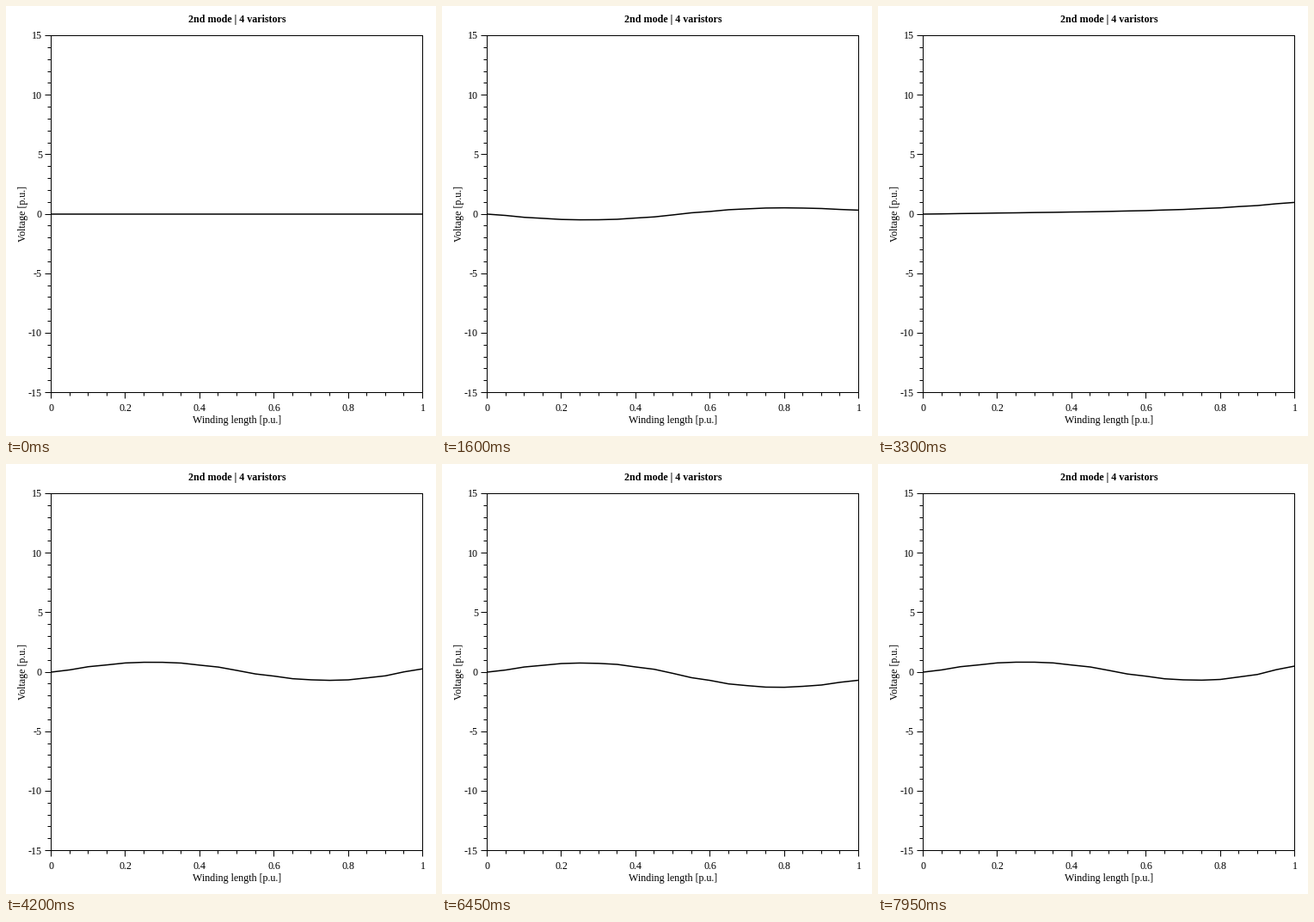
Animation, 500 px wide and 500 px high, one loop 8 s. Source, as a matplotlib script:

```python
import numpy as np
import matplotlib.pyplot as plt
from matplotlib.animation import FuncAnimation

SIZE, DPI = 500, 100
FRAMES, INTERVAL = 160, 50
LEFT, RIGHT, TOP, BOTTOM = 52.5, 484.5, 34.5, 449.5
PX = 72 / DPI  # points per pixel

plt.rcParams["font.family"] = "Liberation Serif"
plt.rcParams["font.size"] = 12 * PX

fig = plt.figure(figsize=(SIZE / DPI, SIZE / DPI), dpi=DPI, facecolor="white")
ax = fig.add_axes([0, 0, 1, 1])
ax.set_xlim(0, SIZE)
ax.set_ylim(SIZE, 0)
ax.axis("off")


def sx(x):
    return LEFT + x * (RIGHT - LEFT)


def sy(v):
    return (TOP + BOTTOM) / 2 - v * (BOTTOM - TOP) / 30


def crisp(p):
    """Centre of the pixel that holds p."""
    return np.floor(p) + 0.5


def stroke(xs, ys):
    ax.plot(xs, ys, color="black", lw=PX, snap=False,
            solid_capstyle="butt", solid_joinstyle="miter")


def label(x, y, text, ha="center", **kw):
    ax.text(x, y, text, ha=ha, va="baseline", color="black", **kw)


def draw_frame():
    stroke([LEFT, RIGHT, RIGHT, LEFT, LEFT, RIGHT],
           [TOP, TOP, BOTTOM, BOTTOM, TOP, TOP])
    for i in range(21):
        x, major = crisp(sx(i / 20)), i % 4 == 0
        stroke([x, x], [BOTTOM, BOTTOM + (7 if major else 4)])
        if major:
            label(sx(i / 20), 471, f"{i / 20:g}")
    for v in range(-15, 16):
        y, major = crisp(sy(v)), v % 5 == 0
        stroke([LEFT - (7 if major else 4), LEFT], [y, y])
        if major:
            label(42, sy(v) + 4, str(v), ha="right")
    label(268.5, 19, "2nd mode | 4 varistors", weight="bold")
    label(268.5, 485, "Winding length [p.u.]")
    label(23, 242, "Voltage [p.u.]", rotation=90, rotation_mode="anchor")


nodes = np.linspace(0, 1, 21)
# Every other node sits slightly nearer to its end of the winding
coil = nodes + 0.01 * np.sign(nodes - 0.5) * (np.arange(21) % 2)
spread = np.sinh(3 * coil) / np.sinh(3)


def voltage(n):
    """Driven at x = 1, grounded at x = 0; the second mode builds up and saturates."""
    surge = 1.9 * np.exp(-((n - 138) / 16) ** 2)
    phase = 0.411 * max(n - 0.6, 0) + surge
    growth = np.tanh(n / 80)
    mode = -1.15 * growth * np.cos(phase - 0.15)
    skew = 1 + 0.4 * growth * (coil - 0.5)
    half = -0.2 * np.exp(-n / 100) * np.cos(phase) * min(n / 8, 1)
    return (np.sin(phase) * spread
            + mode * skew * np.sin(2 * np.pi * coil)
            + half * np.sin(np.pi * coil))


draw_frame()
curve, = ax.plot(sx(nodes), sy(0 * nodes), color="black", lw=1.5 * PX,
                 snap=False, solid_capstyle="butt", zorder=5)


def update(n):
    curve.set_ydata(sy(voltage(n)))
    return curve,


def reset():
    return update(0)


anim = FuncAnimation(fig, update, frames=FRAMES, init_func=reset,
                     interval=INTERVAL, repeat=True, repeat_delay=0, blit=False)
plt.show()
```
